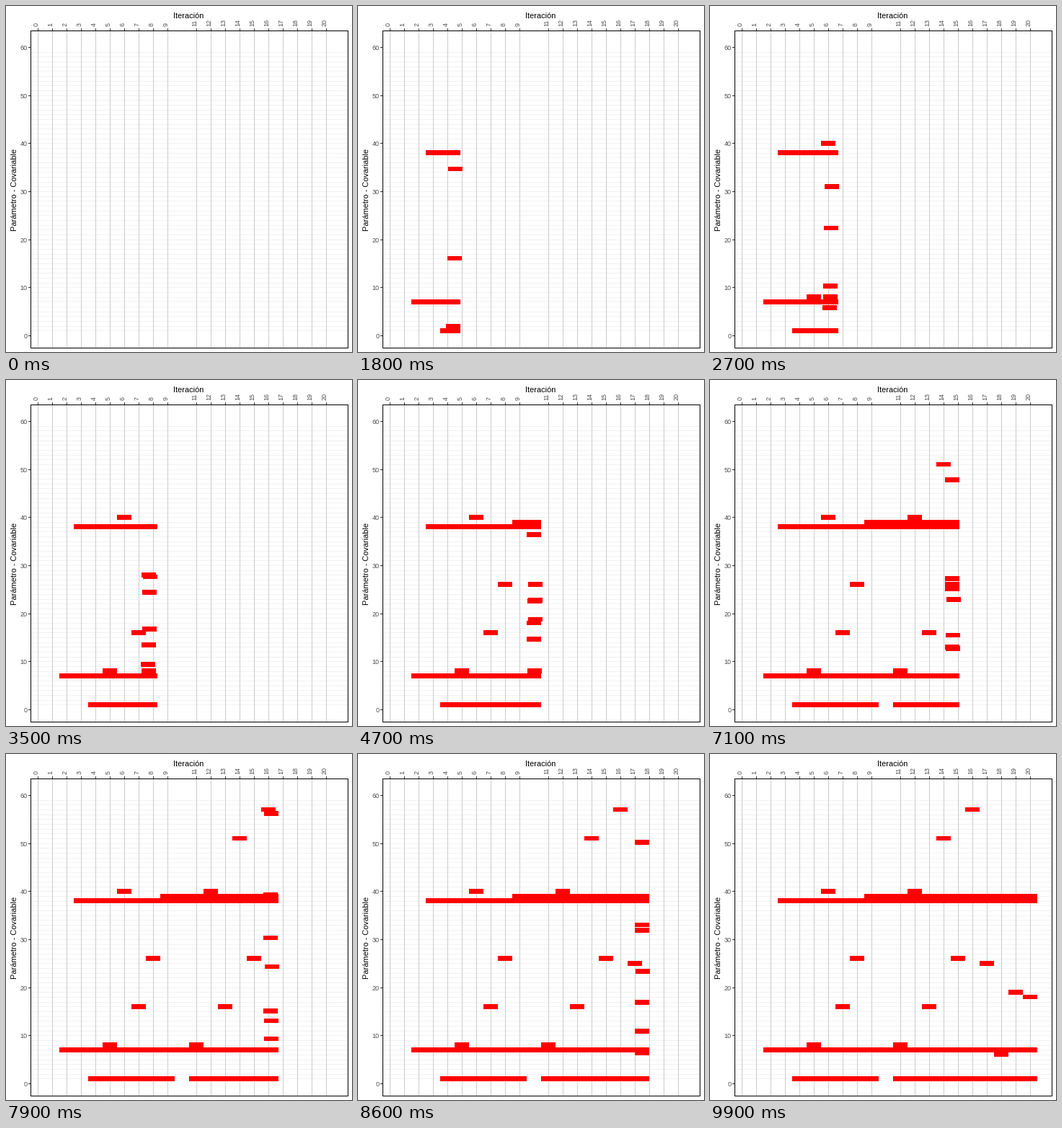
Recreate the animation shown at these times as a matplotlib script. Size 480 px wide and 480 px high, loop 10 s.

```python
import matplotlib.pyplot as plt
from matplotlib.animation import FuncAnimation
from matplotlib.collections import PolyCollection

SIZE, FRAMES = 480, 100
LEFT, TOP, RIGHT, BOTTOM = 34, 34, 474, 474
STEP_X, STEP_Y = 20, 20 / 3
ITERS = [i for i in range(21) if i != 10]

plt.rcParams["font.family"] = "Liberation Sans"
fig = plt.figure(figsize=(SIZE / 100, SIZE / 100), dpi=100, facecolor="white")
ax = fig.add_axes([0, 0, 1, 1])
ax.set_xlim(0, SIZE)
ax.set_ylim(SIZE, 0)
ax.axis("off")


def px(i):
    return 44 + STEP_X * i


def py(v):
    return 457.03 - STEP_Y * v


def box(x0, y0, x1, y1):
    return [(x0, y0), (x1, y0), (x1, y1), (x0, y1)]


def boxes(verts, color, z):
    coll = PolyCollection(verts, facecolors=color, edgecolors="none",
                          linewidths=0, antialiaseds=False, zorder=z)
    coll.set_snap(False)
    return ax.add_collection(coll, autolim=False)


def label(x, y, text, size, color, ha, rotation=0):
    ax.text(x, y, text, fontsize=size * 0.72, color=color, ha=ha,
            va="baseline", rotation=rotation, rotation_mode="anchor")


def hline(y, x0, x1):
    return box(x0, y, x1, y + 1)


def vline(x, y0, y1):
    return box(x, y0, x + 1, y1)


# Grid, ticks and border
boxes([hline(round(py(v)), LEFT, RIGHT) for v in range(1, 60)], "#f2f2f2", 1)
boxes([vline(px(i), TOP, BOTTOM) for i in ITERS], "#cccccc", 2)
boxes([vline(px(i), 31, TOP) for i in ITERS]
      + [hline(round(py(v)), 31, LEFT) for v in range(0, 61, 10)], "#333333", 2)
boxes([hline(TOP, LEFT, RIGHT + 1), hline(BOTTOM, LEFT, RIGHT + 1),
       vline(LEFT, TOP, BOTTOM), vline(RIGHT, TOP, BOTTOM)], "black", 5)

for i in ITERS:
    label(px(i) + 0.5, 28, str(i), 9, "#4d4d4d", "left", 90)
for v in range(0, 61, 10):
    label(29.5, round(py(v)) + 4, str(v), 9, "#4d4d4d", "right")
label(253.5, 17, "Iteración", 11, "black", "center")
label(15, 254.5, "Parámetro - Covariable", 11, "black", "center", 90)


def run(y, *iters):
    return [(i, y) for i in iters]


def span(y, first, last):
    return run(y, *range(first, last + 1))


# Each tile glides to its neighbour in this chain
chain = (
    run(6, 18) + run(18, 20) + run(51, 14)
    + span(7, 2, 20)
    + run(26, 8, 15)
    + span(1, 4, 9) + span(1, 11, 20)
    + span(38, 3, 5) + run(40, 6) + span(38, 6, 11) + run(40, 12)
    + span(38, 12, 20)
    + run(8, 5, 11) + run(19, 19) + run(25, 17)
    + run(16, 7) + span(39, 9, 12) + run(16, 13) + span(39, 13, 20)
    + run(57, 16)
)


def when(i):
    return int((i - 1) * (FRAMES - 1) / 19 + 0.5)


def tile(i, y):
    x0 = int(px(i - 0.5) + 0.5)
    return box(x0, round(py(y + 0.5)), x0 + STEP_X, round(py(y - 0.5)))


def tiles(frame):
    shown = [tile(i, y) for i, y in chain if when(i) <= frame]
    for pair in zip(chain, chain[1:]):
        (i0, y0), (i1, y1) = sorted(pair)
        start, end = when(i0), when(i1)
        if start < frame < end:
            t = (frame - start) / (end - start)
            shown.append(tile(i0 + (i1 - i0) * t, y0 + (y1 - y0) * t))
    return shown


red = boxes([], "#ff0000", 4)


def update(frame):
    red.set_verts(tiles(frame))
    return [red]


anim = FuncAnimation(fig, update, frames=FRAMES, interval=100,
                     repeat=True, repeat_delay=0)
plt.show()
```
